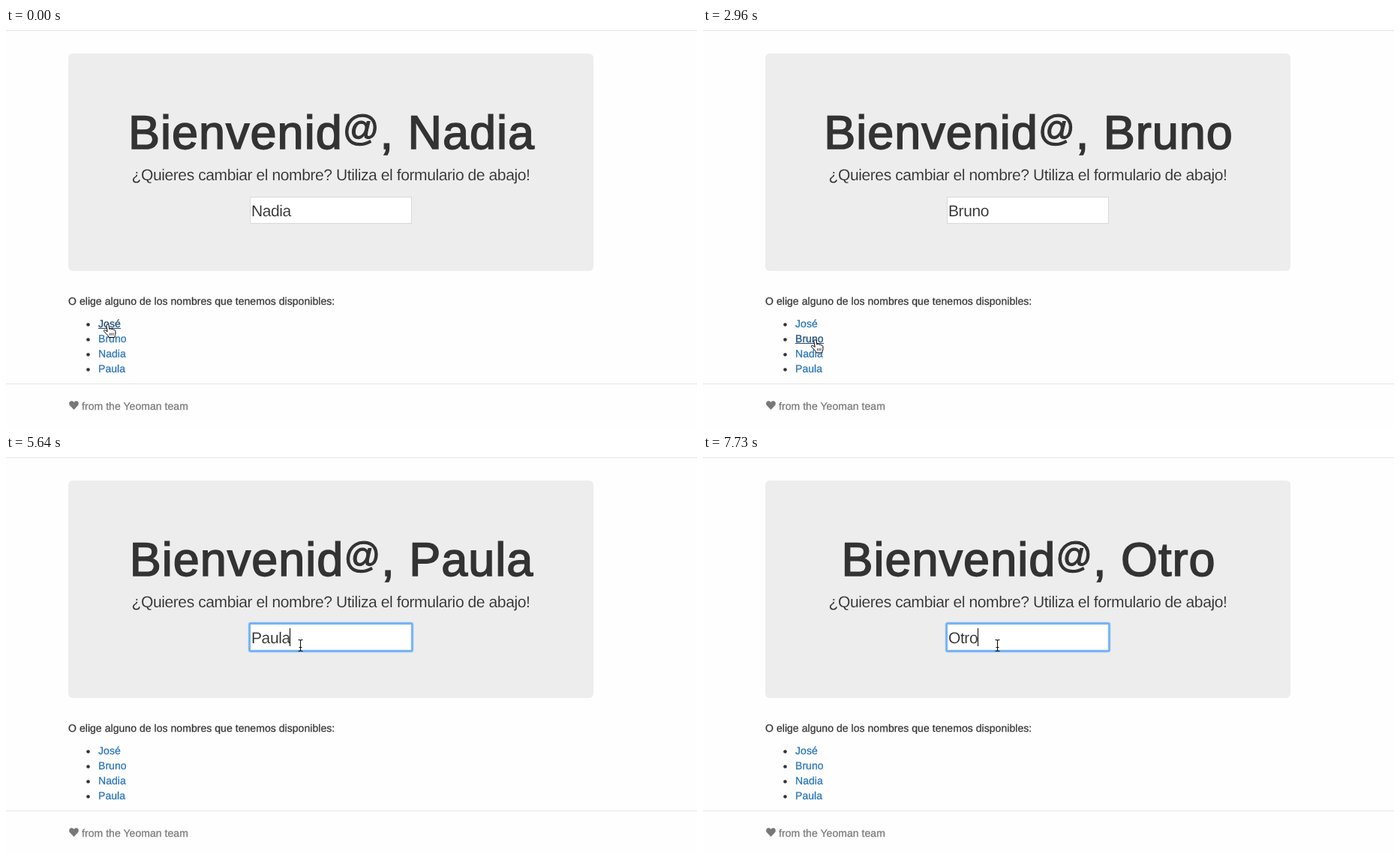
Write an HTML page that moves like this. It is 921x532 px and loops after 8 s.

```html
<!DOCTYPE html>
<html lang="es">
<head>
<meta charset="utf-8">
<title>Bienvenid@</title>
<style>
  html, body { margin: 0; width: 100%; height: 100%; overflow: hidden; background: #fefefe; }
  svg { display: block; width: 921px; height: 532px; }
  text { font-family: "Liberation Sans", Arial, sans-serif; font-size: 14px; letter-spacing: .05px; fill: #333; stroke: #333; stroke-width: .25px; text-rendering: geometricPrecision; }
  .title { font-size: 63px; letter-spacing: 1px; text-anchor: middle; stroke-width: 1.6px; }
  .at { font-size: 48px; stroke-width: 1.2px; }
  .light { font-size: 21px; letter-spacing: -.4px; fill: #2b2b2b; stroke-width: .2px; }
  .lead { text-anchor: middle; stroke: #ededed; }
  .value { stroke: #fff; }
  .link { fill: #2873b6; stroke: #2873b6; }
  .link.on { fill: #1c4a75; stroke: #1c4a75; }
  .foot { fill: #777; stroke: #777; }
</style>
</head>
<body>
<svg viewBox="0 0 921 532">
  <rect width="921" height="532" fill="#fefefe"/>
  <path d="M0 3.5H921M0 474.5H921" stroke="#e5e5e5"/>
  <rect x="83" y="34" width="700" height="290" rx="6" fill="#ededed"/>
  <text class="title" x="434" y="160.5">Bienvenid<tspan class="at" dy="-10.5">@</tspan><tspan dy="10.5">, </tspan><tspan id="who"></tspan></text>
  <text class="light lead" x="433" y="203">¿Quieres cambiar el nombre? Utiliza el formulario de abajo!</text>

  <rect x="325.5" y="225.5" width="215" height="35" fill="#fff" stroke="#d9d9d9"/>
  <g id="ring" fill="none" stroke="#6fb0f8">
    <rect x="324.5" y="224.5" width="217" height="37" rx="2" stroke-width="4" opacity=".35"/>
    <rect x="324.5" y="224.5" width="217" height="37" rx="1.5" stroke-width="2.4"/>
  </g>
  <rect id="mark" x="328" y="231" height="24" fill="#b3d7fe"/>
  <text id="value" class="light value" x="327" y="251"></text>
  <rect id="caret" y="231" width="1" height="24" fill="#000"/>

  <text x="83" y="369">O elige alguno de los nombres que tenemos disponibles:</text>
  <g id="list"></g>
  <path d="M90.5 509L85.3 503.6C83.2 501.2 84.2 497.4 87.2 497.2 88.8 497.1 90 498 90.5 499.2 91 498 92.2 497.1 93.8 497.2 96.8 497.4 97.8 501.2 95.7 503.6Z" fill="#777"/>
  <text class="foot" x="101" y="509">from the Yeoman team</text>

  <g id="cursor">
    <g id="hand" stroke="#000" stroke-linejoin="round">
      <path d="M-2.2 1.2C-2.2-.6.6-.9 1 .9L2 6.2C2.4 5 4.5 5 4.9 6.4 5.6 5.4 7.3 5.8 7.5 7.2 8.4 6.6 9.6 7.2 9.8 8.4L10 11.5C10 13.5 9 14.5 8.8 17H1.2C.6 15-1.6 13-4 10.6-6.4 8.6-5.6 6.6-3.6 7.4L-.8 9.4Z" fill="#fff"/>
      <path d="M2.6 11.2V14.4M4.8 11V14.4M7 11V14.4" stroke-width=".8"/>
    </g>
    <path id="arrow" d="M0-.5V14.3L3.4 11.2 5.8 16.6 8 15.6 5.7 10.4H10.2Z" fill="#000" stroke="#fff"/>
    <path id="beam" d="M-3-7.5H-1L0-6.5 1-7.5H3M0-6.5V6.5M-3 7.5H-1L0 6.5 1 7.5H3M-2 2.5H2" fill="none" stroke="#111" stroke-width="1.1"/>
  </g>
</svg>
<script>
const LOOP = 8000;
const NAMES = ['José', 'Bruno', 'Nadia', 'Paula'];

// [start time, state]
const SHOWN = [[0, NAMES[2]], [150, NAMES[0]], [1780, NAMES[2]], [2960, NAMES[1]],
  [4310, NAMES[3]], [7280, 'O'], [7580, 'Otr'], [7730, 'Otro']];
const FOCUS = [[0, 0], [1630, 2], [2960, 1], [4310, 3], [5640, 'field']];
const CARET = [[0, false], [5640, true], [6090, false], [6530, true], [6830, false], [7280, true]];

// [first step, last step, steps, x, y]
const MOVES = [
  [750, 1040, 3, 148, 426],
  [1190, 1330, 2, 147, 433],
  [2220, 2520, 3, 150, 416],
  [3410, 3710, 3, 152, 453],
  [4460, 5340, 7, 392.5, 254]
];

const $ = id => document.getElementById(id);
const show = (id, on) => $(id).setAttribute('visibility', on ? 'visible' : 'hidden');
const at = (track, t) => track.filter(([start]) => t >= start).pop()[1];
const ease = p => p * p * (3 - 2 * p);

function add(tag, attrs) {
  const el = document.createElementNS('http://www.w3.org/2000/svg', tag);
  for (const key in attrs) el.setAttribute(key, attrs[key]);
  return $('list').appendChild(el);
}

const links = NAMES.map((name, i) => {
  const y = 399 + 20 * i;
  add('circle', { cx: 109.5, cy: y - 3.5, r: 2.3, fill: '#333' });
  const label = add('text', { x: 123, y });
  label.textContent = name;
  const line = add('rect', { x: 123, y: y + 1, height: 1, fill: '#1c4a75' });
  return { label, line };
});

function pointer(t) {
  let x = 136, y = 395.5;
  for (const [from, to, steps, tx, ty] of MOVES) {
    if (t < from) break;
    const step = 1 + Math.floor((t - from) / (to - from) * (steps - 1) + 1e-6);
    const p = Math.min(1, step / steps), k = steps > 3 ? ease(p) : p;
    x += (tx - x) * k;
    y += (ty - y) * k;
  }
  return [x, y];
}

function draw(t) {
  const name = at(SHOWN, t), focus = at(FOCUS, t);
  const [x, y] = pointer(t);
  const hover = links.findIndex((_, i) => x > 122 && x < 161 && Math.abs(y - 395 - 20 * i) < 8.5);
  const inField = x > 325 && x < 541 && y > 225 && y < 261;

  $('who').textContent = name;
  $('value').textContent = name;
  const width = $('value').getComputedTextLength();
  $('caret').setAttribute('x', Math.floor(327 + width));
  $('mark').setAttribute('width', Math.max(0, width - 1));
  show('caret', at(CARET, t));
  show('mark', t >= 6830 && t < 7280);
  show('ring', focus === 'field');

  links.forEach(({ label, line }, i) => {
    const on = i === hover || i === focus;
    label.setAttribute('class', on ? 'link on' : 'link');
    line.setAttribute('width', on ? Math.round(label.getComputedTextLength()) : 0);
  });

  $('cursor').setAttribute('transform', `translate(${x} ${y})`);
  show('hand', hover >= 0);
  show('beam', inField);
  show('arrow', hover < 0 && !inField);
}

const begin = performance.now();
function tick() {
  draw((performance.now() - begin) % LOOP);
  requestAnimationFrame(tick);
}
tick();
</script>
</body>
</html>
```
